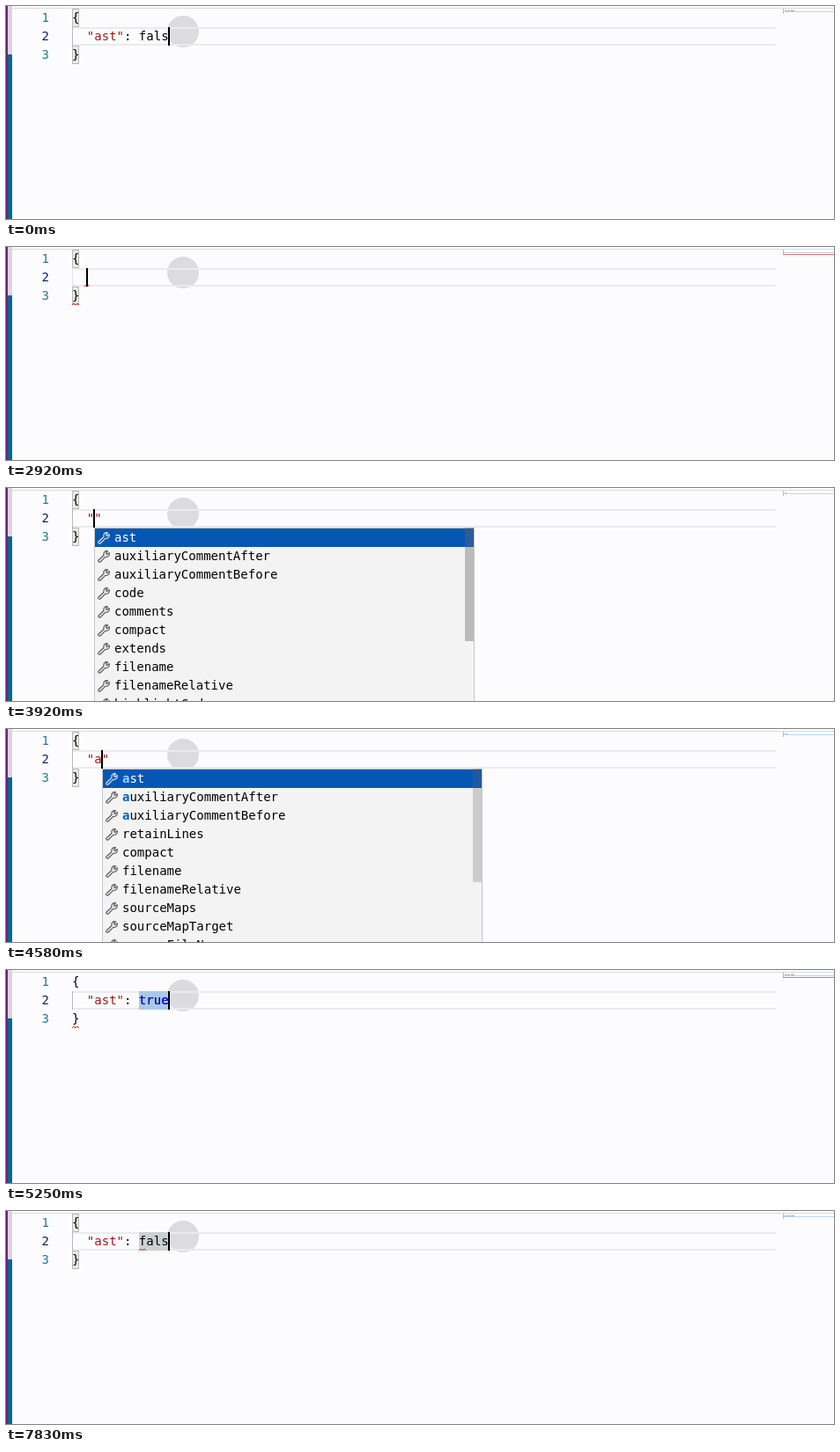
Recreate the animation shown at these times as an HTML page with a canvas. Size 940 by 242 pixels, loop 8 s.

```html
<!DOCTYPE html>
<html>
<head>
<meta charset="utf-8">
<style>
  html, body { margin: 0; width: 100%; height: 100%; overflow: hidden; background: #fcfcfe; }
  canvas { display: block; }
</style>
</head>
<body>
<canvas id="stage" width="940" height="242"></canvas>
<script>
const ctx = document.getElementById('stage').getContext('2d');
const LOOP = 8000, LEFT = 75, CHAR = 8.43, LINE = 21;
const FONT = '14px "DejaVu Sans Mono", monospace';
const ENTRY = '"ast": ';

const ALL = ['ast', 'auxiliaryCommentAfter', 'auxiliaryCommentBefore', 'code', 'comments',
  'compact', 'extends', 'filename', 'filenameRelative', 'highlightCode'];
const FILTERED = ['ast', 'auxiliaryCommentAfter', 'auxiliaryCommentBefore', 'retainLines', 'compact',
  'filename', 'filenameRelative', 'sourceMaps', 'sourceMapTarget', 'sourceFileName'];

// Each event changes part of the editor state; the rest carries over.
const START = { text: ENTRY + 'fals', caret: 11, caretOn: true, brackets: true, field: false,
  selected: false, braceError: false, ruler: false, squiggle: null, menu: null };
const typed = (text, caret = text.length) => ({ text, caret });
const EVENTS = [
  ...[10, 9, 8, 7, 6, 5, 3, 2].map((n, i) => [420 + i * 83, typed(START.text.slice(0, n))]),
  [1170, typed('"')],
  [1500, typed('')],
  [2000, { caretOn: false }],
  [2170, { ...typed('""', 1), caretOn: true }],
  [2670, { braceError: true, ruler: true }],
  [2750, { squiggle: [2, 4] }],
  [2920, { ...typed(''), squiggle: [1.6, 2.5] }],
  [3500, { braceError: false, ruler: false, squiggle: null }],
  [3830, typed('""', 1)],
  [3920, { menu: ALL }],
  [4330, { ...typed('"a"', 2), menu: FILTERED }],
  [4830, { braceError: true, ruler: true }],
  [5170, { ...typed(ENTRY + 'true'), menu: null, field: true, selected: true }],
  [5250, { brackets: false }],
  [5670, { braceError: false, ruler: false }],
  [5920, { ...typed(ENTRY), selected: false }],
  [6000, { brackets: true }],
  [6250, typed(ENTRY + 'f')],
  [6750, { squiggle: [9, 10] }],
  [6830, typed(ENTRY + 'fa')],
  [7250, typed(ENTRY + 'fal')],
  [7420, typed(ENTRY + 'fals')],
  [7500, { ...typed(ENTRY + 'false'), squiggle: null }],
  [7830, { ...typed(ENTRY + 'fals'), squiggle: [9, 10] }],
];

const colX = col => LEFT + col * CHAR;

function rect(x, y, w, h, color) {
  ctx.fillStyle = color;
  ctx.fillRect(x, y, w, h);
}

function label(text, x, y, color, bold) {
  ctx.font = (bold ? 'bold ' : '') + FONT;
  ctx.fillStyle = color;
  ctx.fillText(text, x, y);
}

function squiggle(x1, x2, y) {
  ctx.strokeStyle = '#e8281e';
  ctx.lineWidth = 1;
  ctx.beginPath();
  for (let x = x1, i = 0; x <= x2; x += 2, i++) ctx.lineTo(x, y + (i % 2 ? -1 : 1));
  ctx.stroke();
}

function drawBrackets(on) {
  ['{', '}'].forEach((bracket, i) => {
    const y = 3 + i * 2 * LINE;
    if (on) {
      rect(75, y, 8, LINE, '#b9b9b9');
      rect(76, y + 1, 6, LINE - 2, '#e4efe4');
    }
    label(bracket, LEFT, y + 15, '#000');
  });
}

function drawCode(s) {
  rect(75, 24, 1, LINE, s.text ? '#b8b8b8' : '#e4e4e6');
  if (s.field && s.text.length > ENTRY.length) {
    rect(151, 24, (s.text.length - ENTRY.length) * CHAR, LINE, s.selected ? '#a9c9e6' : '#cbd0d4');
  }
  for (const m of s.text.matchAll(/"[^"]*"?|[^"]+/g)) {
    const color = m[0][0] === '"' ? '#a31515' : '#000';
    label(m[0], colX(2 + m.index), 39, color);
  }
  const literal = s.text.match(/true|false/);
  if (literal) label(literal[0], colX(2 + literal.index), 39, '#0000ff');
  if (s.squiggle) squiggle(colX(s.squiggle[0]), colX(s.squiggle[1]), 44);
  if (s.caretOn) rect(Math.floor(colX(2 + s.caret) - 0.5), 24, 2, LINE, '#000');
}

function drawMinimap(s) {
  rect(882, 3, 1, 6, s.ruler ? '#d8a8a8' : '#b0bccc');
  rect(883, 6, 57, 1, '#b4daf6');
  if (s.ruler) rect(882, 8, 58, 1, '#fa6c66');
  [...s.text].forEach((c, i) => {
    if (c !== ' ') rect(884 + i, 5, 1, 1, i < 5 ? '#c8b4b8' : '#a0a4ac');
  });
}

function wrench(x, y, color) {
  ctx.save();
  ctx.translate(x, y);
  ctx.lineJoin = 'round';
  ctx.strokeStyle = color;
  ctx.lineWidth = 1.1;
  ctx.stroke(new Path2D('M1 11 L7 5.5 C6 2 8.5 0 11.5 .8 L9.3 3 L10.7 4.6 L13.2 2.5 C14 6 11.5 8 8.7 7.3 L3 13 C1 13.5 .2 12.3 1 11Z'));
  ctx.restore();
}

function drawMenu(items, caret, scrollbar) {
  const x = Math.round(colX(2 + caret)), width = 432;
  rect(x, 45, width, 200, '#c8c8c8');
  rect(x + 1, 46, width - 2, 200, '#f3f3f3');
  rect(x + 1, 46, width - 2, LINE, '#0657b4');
  items.forEach((item, i) => {
    const y = 61 + i * LINE, color = i ? '#000' : '#fff';
    wrench(x + 4, y - 11, i ? '#555558' : '#e2e6ea');
    label(item, x + 23, y, color);
    if (items === FILTERED && item[0] === 'a') {
      rect(x + 23, y - 9, 8.2, 11, i ? '#f3f3f3' : '#0657b4');
      label('a', x + 23, y, i ? '#0062c4' : '#9cd2ff', true);
    }
  });
  rect(x + width - 11, 45, 10, 129, `rgba(100,100,100,${0.4 * scrollbar})`);
}

function draw(t) {
  const s = Object.assign({}, START);
  for (const [time, change] of EVENTS) if (t >= time) Object.assign(s, change);

  rect(0, 0, 940, 242, '#fcfcfe');
  rect(0, 0, 2, 242, '#70207c');
  rect(2, 0, 5, 55, '#dcd4dc');
  rect(2, 55, 5, 187, '#0b6690');
  rect(7, 2, 933, 1, '#dcdcde');

  ctx.fillStyle = '#dcdce0';
  ctx.beginPath();
  ctx.arc(201, 29, 18, 0, 7);
  ctx.fill();
  rect(76, 24, 798, 2, '#ebebed');
  rect(76, 43, 798, 2, '#ebebed');

  for (let n = 1; n <= 3; n++) label(n, 40.5, 18 + (n - 1) * LINE, n === 2 ? '#0b216f' : '#237893');
  drawBrackets(s.brackets);
  if (s.braceError) squiggle(75, 83, 65);
  drawCode(s);
  drawMinimap(s);

  // The scrollbar fades once the list has been filtered.
  if (s.menu) drawMenu(s.menu, s.caret, Math.min(1, Math.max(0, (5130 - t) / 800)));
}

const begin = performance.now();
function tick() {
  draw((performance.now() - begin) % LOOP);
  requestAnimationFrame(tick);
}
tick();
</script>
</body>
</html>
```
